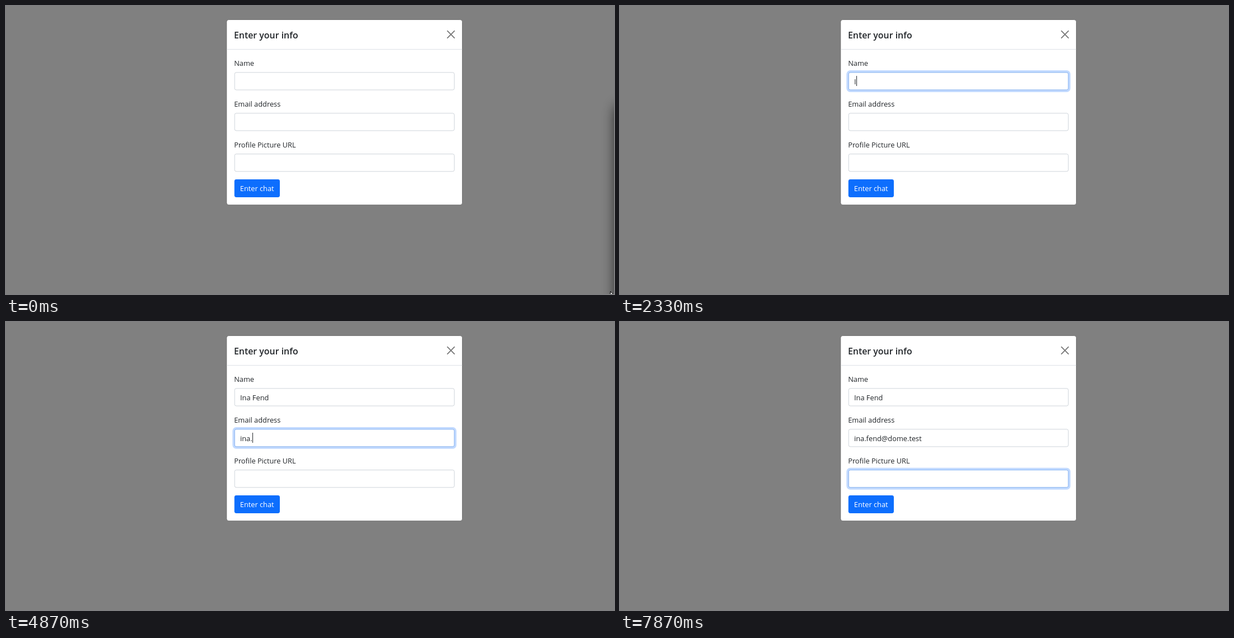
Recreate the animation shown at these times as an HTML page. Size 1088 by 515 pixels, loop 8 s.

```html
<!DOCTYPE html>
<html lang="en">
<head>
<meta charset="utf-8">
<title>Enter your info</title>
<style>
  html, body { margin: 0; width: 100%; height: 100%; overflow: hidden; background: #808080; }
  svg { display: block; }
  text { font: 12.8px "Open Sans", "Noto Sans", sans-serif; fill: #212529; white-space: pre; }
  .title { font-size: 15.9px; font-weight: 600; }
  .button { fill: #fff; font-weight: 500; }
</style>
</head>
<body>
<svg id="stage" width="1088" height="515" viewBox="0 0 1088 515">
  <defs>
    <filter id="blur" x="-100%" y="-20%" width="300%" height="140%"><feGaussianBlur stdDeviation="12"/></filter>
  </defs>
  <rect width="1088" height="515" fill="#808080"/>
  <rect id="shade" x="1092" y="180" width="80" height="450" opacity=".85" filter="url(#blur)"/>
  <rect x="394.75" y="24.4" width="421.85" height="331.4" rx="4" fill="#fff" stroke="#666" stroke-width=".85"/>
  <path d="M395.2 77.5H816.2" stroke="#dee2e6"/>
  <path d="M790 44.7l12.4 12.4m0-12.4l-12.4 12.4" stroke="#7a7a7a" stroke-width="1.9" stroke-linecap="round"/>
  <text class="title" x="408" y="57.5">Enter your info</text>
  <g id="fields"></g>
  <rect x="408.7" y="310" width="81.3" height="32" rx="3.4" fill="#0d6efd"/>
  <text class="button" x="418.8" y="331">Enter chat</text>
  <rect id="caret" width="1" height="18" fill="#212529"/>
  <g id="pointer">
    <path id="arrow" d="M.5 .5V16.5L4.2 13 6.6 18.6 9 17.6 6.6 12.1H11.8Z" fill="#fff" stroke="#000"/>
    <path id="beam" d="M-3 -7.5H-1L0 -6.5 1 -7.5H3M0 -6.5V6.5M-3 7.5H-1L0 6.5 1 7.5H3" fill="none" stroke="#222"/>
  </g>
</svg>
<script>
const LOOP = 8000, TICK = 1000 / 15, BLINK = 530, FADE = 150;
const LEFT = 408.7, TOP = 118.4, PITCH = 72.9, WIDTH = 394, HEIGHT = 32.1;
const $ = id => document.getElementById(id);

function add(parent, tag, attrs, text = "") {
  const el = document.createElementNS("http://www.w3.org/2000/svg", tag);
  for (const key in attrs) el.setAttribute(key, attrs[key]);
  el.textContent = text;
  return parent.appendChild(el);
}

const box = (y, grow, attrs) => add($("fields"), "rect", {
  x: LEFT - grow, y: y - grow, width: WIDTH + 2 * grow, height: HEIGHT + 2 * grow, rx: 3.4 + grow, ...attrs
});

const fields = ["Name", "Email address", "Profile Picture URL"].map((label, i) => {
  const y = TOP + PITCH * i;
  add($("fields"), "text", { x: 408.2, y: Math.round(y) - 11 }, label);
  const ring = box(y, 3.4, { fill: "#0d6efd" });
  box(y, -0.45, { fill: "#fff", stroke: "#ced4da" });
  const border = box(y, -0.45, { fill: "none", stroke: "#86b7fe" });
  const value = add($("fields"), "text", { x: 419, y: Math.round(y) + 22 });
  return { y, ring, border, value };
});

// When each field takes the focus; the next one's start ends it.
const focusAt = [1185, 4010, 7320, Infinity];

// Key presses: [time, field, text]
const keys = [[1185, 0, ""], [2195, 0, ""]];
function type(field, text, times, from = 0) {
  times.forEach((time, i) => keys.push([time, field, text.slice(0, from + i + 1)]));
}
type(0, "Ina Feg", [2330, 2600, 2730, 2800, 2930, 3130, 3270]);
keys.push([3670, 0, "Ina Fe"]);
type(0, "Ina Fend", [3800, 3930], 6);
keys.push([4010, 1, ""]);
type(1, "ina.fend@dome.test", [4330, 4470, 4600, 4870, 5130, 5270, 5330, 5470, 5730,
  6000, 6130, 6270, 6330, 6530, 6800, 7000, 7130, 7270]);
keys.push([7320, 2, ""]);

// Pointer path: [time, x, y]
const path = [[0, 1081, 510], [67, 1081, 510], [400, 900, 400], [667, 620, 232], [933, 497, 157],
  [1000, 496, 147], [1133, 496, 143], [1333, 496, 143], [1400, 420, 240], [1467, 307, 420], [1533, 200, 540]];

const clamp = v => Math.max(0, Math.min(1, v));
const ease = (t, start) => { const p = clamp((t - start) / FADE); return p * p * (3 - 2 * p); };

function drawPointer(t) {
  const next = path.findIndex(p => p[0] > t);
  $("pointer").style.display = next < 0 ? "none" : "";
  if (next < 0) return;
  const [t0, x0, y0] = path[next - 1], [t1, x1, y1] = path[next];
  const k = (t - t0) / (t1 - t0);
  const x = x0 + (x1 - x0) * k, y = y0 + (y1 - y0) * k;
  const overField = x > LEFT && x < LEFT + WIDTH && fields.some(f => y > f.y && y < f.y + HEIGHT);
  $("arrow").style.display = overField ? "none" : "";
  $("beam").style.display = overField ? "" : "none";
  $("pointer").setAttribute("transform", `translate(${Math.round(x)} ${Math.round(y)})`);
}

function drawCaret(t, key) {
  const on = key && (t - key[0]) % (2 * BLINK) < BLINK;
  $("caret").style.display = on ? "" : "none";
  if (!on) return;
  const { y, value } = fields[key[1]];
  const width = key[2] ? value.getComputedTextLength() : 0;
  $("caret").setAttribute("x", Math.round(419.6 + width));
  $("caret").setAttribute("y", Math.round(y) + (key[2] ? 7 : 8));
}

function draw(time) {
  // Snap to 15 steps per second, with a little slack for times rounded to 10 ms.
  const t = Math.floor((time + 4) / TICK) * TICK + 4;
  const past = keys.filter(k => k[0] <= t);
  fields.forEach((f, i) => {
    const glow = ease(t, focusAt[i]) - ease(t, focusAt[i + 1]);
    f.ring.setAttribute("opacity", 0.25 * glow);
    f.border.setAttribute("opacity", glow);
    const last = past.filter(k => k[1] === i).pop();
    const text = last ? last[2] : "";
    if (f.value.textContent !== text) f.value.textContent = text;
  });
  $("shade").style.display = t < focusAt[0] ? "" : "none";
  drawCaret(t, past[past.length - 1]);
  drawPointer(t);
}

const start = performance.now();
function frame() {
  draw((performance.now() - start) % LOOP);
  requestAnimationFrame(frame);
}
frame();
</script>
</body>
</html>
```
